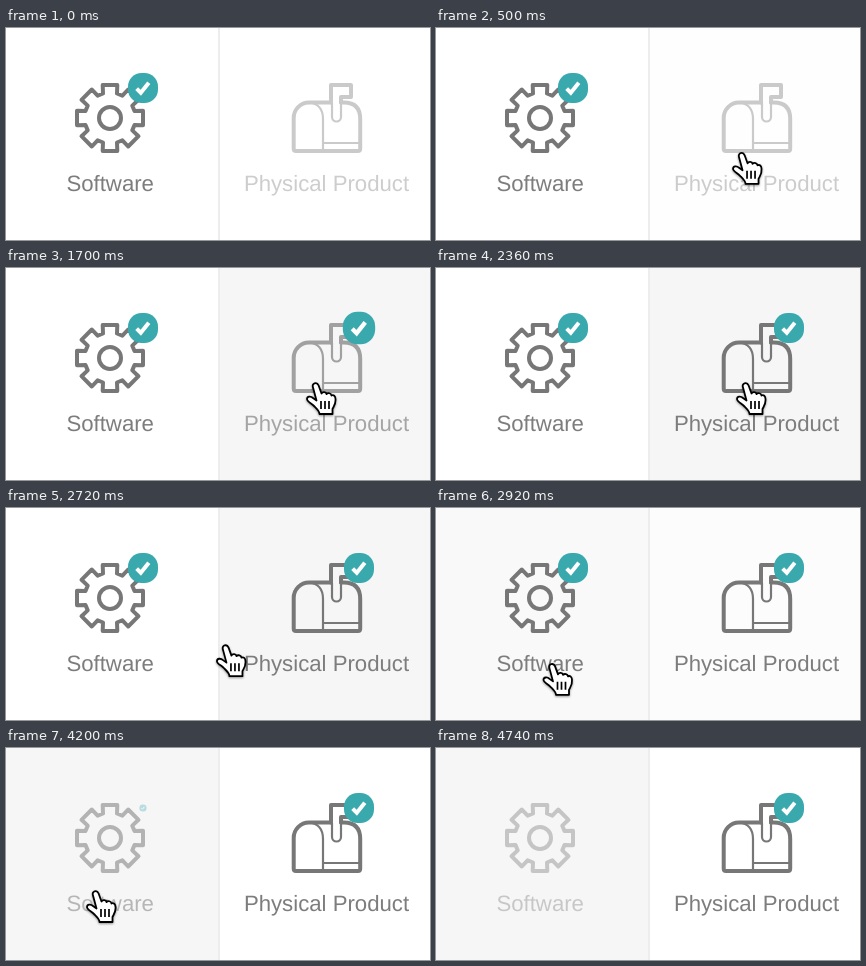
An HTML page for the animation above (6200 ms loop, 424 by 212 pixels).

```html
<!DOCTYPE html>
<html lang="en">
<head>
<meta charset="utf-8">
<title>Product type picker</title>
<style>
  html, body { margin: 0; width: 100%; height: 100%; overflow: hidden; background: #fff; }
  svg { display: block; width: 100%; height: 100%; }
  text {
    font: 22.2px "Liberation Sans", Arial, sans-serif;
    font-kerning: none;
    text-rendering: geometricPrecision;
    text-anchor: middle;
    fill: #7d7d7d;
  }
  .icon { fill: none; stroke: #777; stroke-width: 4; stroke-linejoin: round; stroke-linecap: round; }
  .thin { stroke-width: 2.2; }
  #hand { filter: drop-shadow(0 1px 1px rgba(0, 0, 0, .4)); }
</style>
</head>
<body>
<svg viewBox="0 0 424 212">
  <defs>
    <g id="check">
      <rect x="-15" y="-15" width="30" height="30" rx="13.5" fill="#3aa9ae"/>
      <path d="M-6.3 .6L-2.2 4.8L5.8 -5.2" fill="none" stroke="#fff" stroke-width="4"/>
    </g>
  </defs>
  <rect id="leftBg" width="213" height="212" fill="#f6f6f6"/>
  <rect id="rightBg" x="213" width="211" height="212" fill="#f6f6f6"/>
  <rect x="212" width="2" height="212" fill="#ededed"/>

  <g id="software">
    <g class="icon" transform="translate(104 90)">
      <path id="gear"/>
      <circle r="11"/>
    </g>
    <text x="104.2" y="163">Software</text>
  </g>

  <g id="physical">
    <g class="icon">
      <path d="M325 74.5H303A15.3 15.3 0 0 0 287.7 90V120.5Q287.7 123 290 123H352Q354.2 123 354.2 120.5V91Q354.2 74.5 338 74.5H335"/>
      <path d="M325 74.5V57H345V69H335V74.5"/>
      <path class="thin" d="M303 74.5Q317 76 317 91V122M317 115H353M326 75V89A4.5 4.5 0 0 0 335 89V75"/>
    </g>
    <text x="320.5" y="163">Physical Product</text>
  </g>

  <use id="softwareCheck" href="#check"/>
  <use id="physicalCheck" href="#check"/>

  <g id="hand">
    <path fill="#fff" stroke="#000" stroke-width="1.8" stroke-linejoin="round"
      d="M-2 4.5C-3.5 0 2 -1.5 3.6 2.5L6.5 10.5C7.5 8.5 11 8.5 11.5 11C13 9.5 16 10 16.5 12.5C18.5 11.5 20.5 13 20.5 16C21 21 19 23 17.5 26V31H4.5C4.5 28 2 26 -1 23C-4 20 -8 18.5 -8 16C-8 13 -4 13 -2 15L1.5 17.5Z"/>
    <path fill="none" stroke="#000" stroke-width="1.7" d="M6 18V26M10 18V26M14 18V26"/>
  </g>
</svg>
<script>
const LOOP = 6200;
const DIM = 0.38;
const $ = id => document.getElementById(id);

// Eight square teeth around the centre.
const tooth = [[-7, -24.5], [-7.3, -33], [7.3, -33], [7, -24.5]];
const gearPoints = [];
for (let i = 0; i < 8; i++) {
  const c = Math.cos(i * Math.PI / 4), s = Math.sin(i * Math.PI / 4);
  for (const [x, y] of tooth) gearPoints.push([x * c - y * s, x * s + y * c]);
}
$('gear').setAttribute('d', 'M' + gearPoints.join('L') + 'Z');

// Pointer strokes as [time, x, y]; it rests at the end of each one.
const strokes = [
  [[270, 300, 206], [400, 301, 156], [500, 305, 125], [620, 309, 115]],
  [[2490, 309, 115], [2600, 281, 122], [2720, 219.5, 137], [2840, 150, 155], [2940, 110, 155], [3080, 89, 143]],
  [[4660, 89, 143], [4700, 91, 162], [4740, 92, 214]]
];

const progress = (t, start, length) => Math.min(1, Math.max(0, (t - start) / length));
const ease = p => p * p * (3 - 2 * p);
const backOut = p => 1 + 2.7 * (p - 1) ** 3 + 1.7 * (p - 1) ** 2;

function slope(keys, i, axis) {
  if (i === 0 || i === keys.length - 1) return 0;
  const a = keys[i - 1], b = keys[i + 1];
  return (b[axis] - a[axis]) / (b[0] - a[0]);
}

function along(keys, t, axis) {
  const last = keys.length - 1;
  if (t >= keys[last][0]) return keys[last][axis];
  const i = keys.findIndex(k => k[0] > t) - 1;
  const a = keys[i], b = keys[i + 1], span = b[0] - a[0], p = (t - a[0]) / span;
  const e = ease(p);
  return a[axis] * (1 - e) + b[axis] * e
    + span * p * (1 - p) * ((1 - p) * slope(keys, i, axis) - p * slope(keys, i + 1, axis));
}

function placeHand(t) {
  const stroke = strokes.filter(keys => keys[0][0] <= t).pop();
  const visible = t >= 280 && t < 4740;
  $('hand').setAttribute('visibility', visible ? 'visible' : 'hidden');
  if (visible) $('hand').setAttribute('transform', `translate(${along(stroke, t, 1)} ${along(stroke, t, 2)})`);
}

function placeCheck(id, x, scale, opacity) {
  $(id).setAttribute('transform', `translate(${x} 60) scale(${scale})`);
  $(id).setAttribute('opacity', opacity);
}

function draw(t) {
  const swap = progress(t, 2720, 300);
  $('leftBg').setAttribute('opacity', swap);
  $('rightBg').setAttribute('opacity', progress(t, 460, 300) - swap);

  const picked = progress(t, 1530, 360), dropped = progress(t, 4030, 250);
  $('physical').setAttribute('opacity', DIM + (1 - DIM) * ease(picked));
  $('software').setAttribute('opacity', 1 - (1 - DIM) * ease(dropped));
  placeCheck('physicalCheck', 353, Math.max(0, backOut(picked)), Math.min(1, picked * 3));
  placeCheck('softwareCheck', 137, 1 - ease(dropped), 1 - dropped);
  placeHand(t);
}

function tick() {
  draw(performance.now() % LOOP);
  requestAnimationFrame(tick);
}
tick();
</script>
</body>
</html>
```
